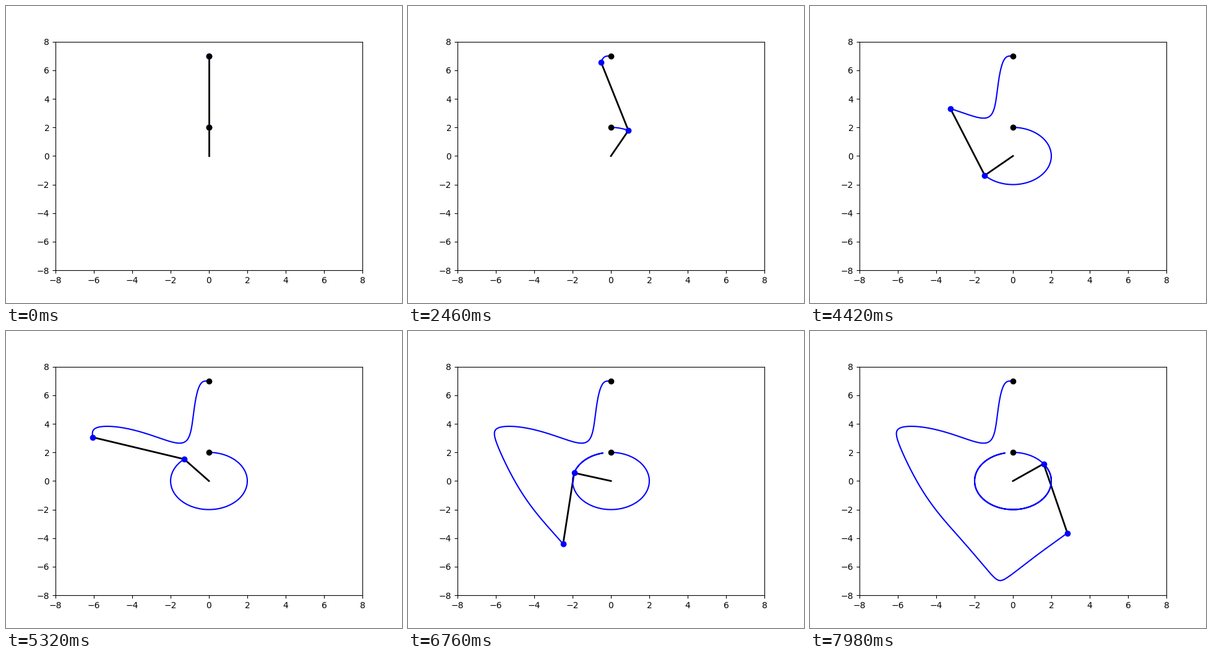
A matplotlib script that plays this animation: 640 by 480 pixels, repeating every 8000 ms.

```python
import numpy as np
import matplotlib.pyplot as plt
from matplotlib.animation import FuncAnimation

FRAMES, INTERVAL = 400, 20
DT, SUBSTEPS = 0.01, 5
G = 9.81
L1, L2 = 2.0, 5.0
M1, M2 = 1.0, 2.0
START = (0.0, 0.0, 0.0, -0.05)  # angles from upright, then angular speeds


def deriv(state):
    a1, a2, w1, w2 = state
    mu = M2 / (M1 + M2)
    c, s = np.cos(a1 - a2), np.sin(a1 - a2)
    r1 = G * np.sin(a1) - mu * L2 * w2**2 * s
    r2 = G * np.sin(a2) + L1 * w1**2 * s
    d = 1 - mu * c**2
    return np.array([w1, w2, (r1 - mu * c * r2) / (L1 * d), (r2 - c * r1) / (L2 * d)])


def rk4(y, h):
    k1 = deriv(y)
    k2 = deriv(y + h / 2 * k1)
    k3 = deriv(y + h / 2 * k2)
    k4 = deriv(y + h * k3)
    return y + h / 6 * (k1 + 2 * k2 + 2 * k3 + k4)


def simulate():
    y = np.array(START)
    states = [y]
    for _ in range(FRAMES - 1):
        for _ in range(SUBSTEPS):
            y = rk4(y, DT / SUBSTEPS)
        states.append(y)
    return np.array(states)


states = simulate()
a1, a2 = states[:, 0], states[:, 1]
x1, y1 = L1 * np.sin(a1), L1 * np.cos(a1)
x2, y2 = x1 + L2 * np.sin(a2), y1 + L2 * np.cos(a2)

fig, ax = plt.subplots(figsize=(6.4, 4.8), dpi=100)
ax.set_xlim(-8, 8)
ax.set_ylim(-8, 8)

rods, = ax.plot([], [], color="black", lw=2)
trails = [ax.plot([], [], color="blue", lw=1.5)[0] for _ in range(2)]
bobs, = ax.plot([], [], "o", color="blue")
ax.plot([x1[0], x2[0]], [y1[0], y2[0]], "o", color="black")


def update(i):
    rods.set_data([0, x1[i], x2[i]], [0, y1[i], y2[i]])
    bobs.set_data([x1[i], x2[i]], [y1[i], y2[i]])
    for trail, x, y in zip(trails, (x1, x2), (y1, y2)):
        trail.set_data(x[:i + 1], y[:i + 1])
    return [rods, bobs, *trails]


anim = FuncAnimation(fig, update, frames=FRAMES, interval=INTERVAL,
                     repeat=True, repeat_delay=0)
plt.show()
```
